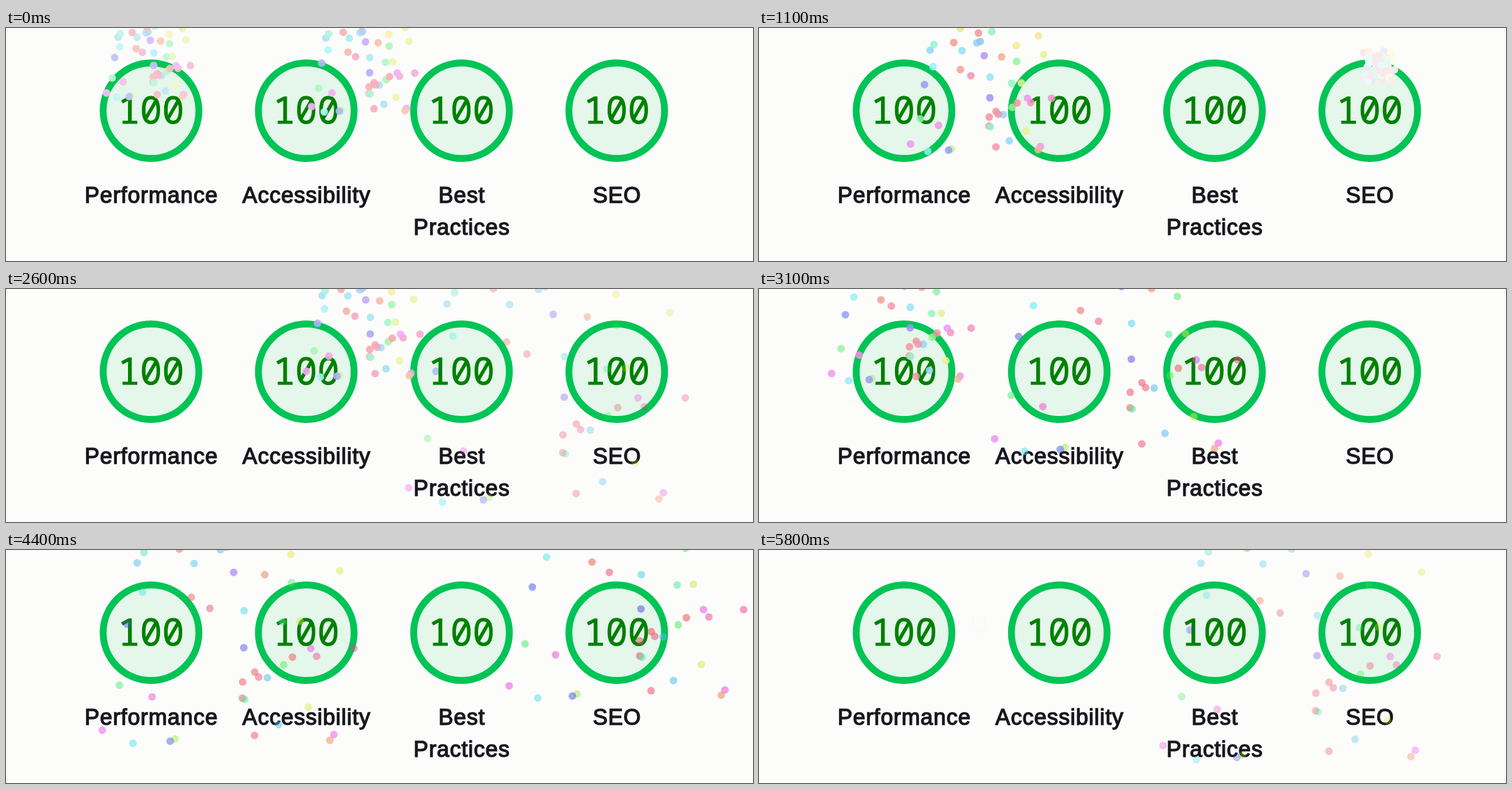
An HTML page with a canvas that plays this animation: 1280x400 px, repeating every 5900 ms.

```html
<!DOCTYPE html>
<html lang="en">
<head>
<meta charset="utf-8">
<title>Scores</title>
<style>
  html, body { margin: 0; width: 100%; height: 100%; overflow: hidden; background: #fcfcfb; }
  svg, canvas { position: absolute; left: 0; top: 0; width: 1280px; height: 400px; }
  circle { fill: #e5f6eb; stroke: #00c456; stroke-width: 11.8; }
  text { text-anchor: middle; }
  .score {
    font: 63px "Noto Sans Mono", monospace;
    fill: #008000; stroke: #008000; stroke-width: 1;
  }
  .label {
    font: 38px "Liberation Sans", Arial, sans-serif;
    letter-spacing: 1px;
    fill: #18181f; stroke: #18181f; stroke-width: 1.5;
  }
</style>
</head>
<body>
<svg id="scores" viewBox="0 0 1280 400"></svg>
<canvas id="sky" width="1280" height="400"></canvas>
<script>
const LABELS = ['Performance', 'Accessibility', 'Best Practices', 'SEO'];

document.getElementById('scores').innerHTML = LABELS.map((label, i) => `
  <g transform="translate(${248.5 + 266 * i} 0)">
    <circle cy="142" r="82"/>
    <text class="score" y="163.5">100</text>
    ${label.split(' ').map((word, row) =>
      `<text class="label" x=".5" y="${299.5 + 55 * row}">${word}</text>`).join('')}
  </g>`).join('');

const ctx = document.getElementById('sky').getContext('2d');
const LOOP = 5900, STEP = 100, START = -234;
const UNIT = 16 / 15, FALL = 200 * UNIT, RADIUS = 6.5;

// Where successive bursts go off; both shells walk the same route
const SPOTS = [[612, 93], [380.5, 133], [927, 120], [244, 80], [1063, 80]];
const SHELLS = [{ period: 1002, first: 0 }, { period: 1254, first: 3 }];

function seeded(seed) {
  return () => {
    seed = (seed + 0x6d2b79f5) | 0;
    let n = Math.imul(seed ^ (seed >>> 15), seed | 1);
    n ^= n + Math.imul(n ^ (n >>> 7), n | 61);
    return ((n ^ (n >>> 14)) >>> 0) / 2 ** 32;
  };
}

// Every burst throws the same sparks, mostly upwards
const random = seeded(7);
const between = (a, b) => a + (b - a) * random();
const sparks = Array.from({ length: 50 }, () => ({
  x: between(-245, 250) * UNIT,
  y: between(-385, 91) * UNIT,
  hue: between(0, 360)
}));

// cubic-bezier(0, 0, .58, 1), solved by bisection
function easeOut(u) {
  let lo = 0, hi = 1;
  for (let i = 0; i < 24; i++) {
    const s = (lo + hi) / 2;
    if (s * s * (1.74 - 0.74 * s) < u) lo = s; else hi = s;
  }
  return lo * lo * (3 - 2 * lo);
}
const easeIn = u => 1 - easeOut(1 - u);

function drawBurst(t, { period, first }) {
  const age = (t - START) / period;
  const count = Math.floor(age);
  const [cx, cy] = SPOTS[(count + first) % SPOTS.length];
  const spread = easeOut(age - count), drop = easeIn(age - count);

  ctx.globalAlpha = 1 - drop;
  for (const { x, y, hue } of sparks) {
    ctx.fillStyle = `hsl(${hue}, 80%, ${100 - 48 * spread}%)`;
    ctx.beginPath();
    ctx.arc(cx + x * spread, cy + y * spread + FALL * drop, RADIUS, 0, Math.PI * 2);
    ctx.fill();
  }
}

function draw(now) {
  const t = Math.floor((now % LOOP) / STEP) * STEP;
  ctx.clearRect(0, 0, 1280, 400);
  for (const shell of SHELLS) drawBurst(t, shell);
}

let begin;
function tick(now) {
  begin ??= now;
  draw(now - begin);
  requestAnimationFrame(tick);
}
draw(0);
requestAnimationFrame(tick);
</script>
</body>
</html>
```
